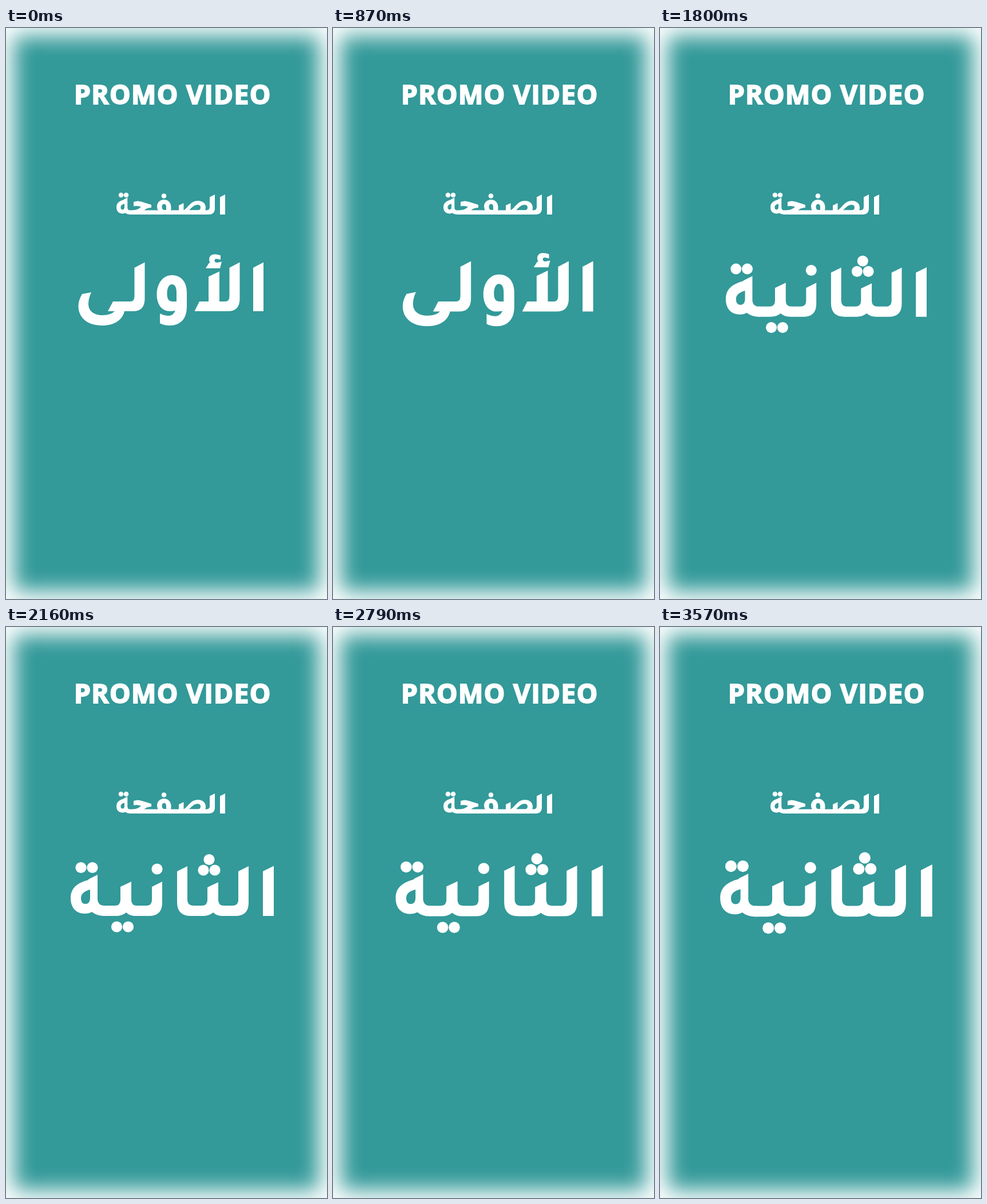
Animation, 561 px wide and 998 px high, one loop 3600 ms. Source, as an HTML page with a canvas:

```html
<!DOCTYPE html>
<html lang="ar">
<head>
<meta charset="utf-8">
<title>Promo video</title>
<style>
  html, body { margin: 0; width: 100%; height: 100%; overflow: hidden; }
  .stage {
    width: 561px;
    height: 998px;
    background: #339999;
    box-shadow: inset 0 0 37px 14px #fff;
  }
  canvas { display: block; }
</style>
</head>
<body>
<div class="stage">
  <canvas id="view" width="561" height="998">PROMO VIDEO – الصفحة الأولى – الصفحة الثانية</canvas>
</div>
<script>
const LOOP = 3600;
const STEP = 30;
const SWITCH_AT = 1800;
const GROWTH = 0.12;
const SECOND_SCALE = 1.072; // growth at which the second word was laid out

const ctx = document.getElementById('view').getContext('2d');

// Final teh marbuta, shared by both lettering sizes.
const TEH = 'M174 505H171Q159 505 150 498Q145 501 138 501C122 501 113 490 113 474' +
  'C113 455 126 447 144 442V441L160 433V476Q161 487 172 487H174Z' +
  'M147 459Q131 463 131 474Q131 484 139 484Q146 484 147 475Z';

const lettering = (shapes, dots = [], radius = 0) => ({
  paths: shapes.map(d => new Path2D(d)), dots, radius
});

const pageWord = lettering([
  'M374 295.5L383 291V326H374Z',
  'M356 295.5L365 291V315Q365 326 354 326H217V318.5H351Q356 318 356 313Z',
  'M302 310L310.5 306V320H302Z',
  'M307 326V320C317 318 321 302 335 302C345 302 349 308 349 314Q349 321 344 326Z' +
  'M320 318.5C326 312 330 309 335 309Q340 309 340 313.5Q340 318.5 335 318.5Z',
  'M276 300C284 300 288.5 306 288.5 313V316Q288 324 280 324H273Q264 321 264 312' +
  'C264 305 269 300 276 300Z' +
  'M276.5 307.5Q272.5 308 272.5 312.5Q272.5 318 277 318H280V313Q280 308 276.5 307.5Z',
  'M223 304Q230 301 238 304L254 309V314Q245 314 240 320Q234 326 222 326V318.5' +
  'Q231 318 236 312.5Q230 310 223 311.5Z'
], [[201, 292], [210, 292], [276, 293.5]], 4.3);

const firstWord = lettering([
  'M432 419L450 409.5V495H432Z',
  'M390.5 419L408.5 409.5V474Q408 495 388 495H329.5L338 478H354V434.5L373 425.5V478' +
  'H383Q390.5 478 390.5 469Z',
  'M349 420L355 410.5H357Q355 408 355 405Q355 395.5 365 395.5Q370 395.5 375 397.5' +
  'V405Q370 403 367 403.5Q364 404 364.5 407Q365 410 369 410L377 408.5L374 420Z',
  'M290 432C306 432 316 444 316 462V487C316 508 305 520 286 520Q276 520 269 516V499' +
  'Q277 503 284 503Q292 503 296 494Q291 495 286 495C271 495 263.5 481 263.5 466' +
  'C263.5 447 274 432 290 432Z' +
  'M290 448C284 448 281.5 456 281.5 464C281.5 473 284 478 291 478H298V462C298 453 295 448 290 448Z',
  'M224.5 419L242.5 409.5V474Q242 495 222 495H207C203 511 189 520 168 520' +
  'C142 520 126.5 506 126.5 486Q126.5 476 133 465L149 462Q144 473 144 482' +
  'C144 495 154 502 169 502Q183 502 190 495H178L187 478H217Q224.5 478 224.5 469Z'
]);

const secondWord = lettering([
  'M449 427L468 417.5V505H449Z',
  'M406 427L424 418V482Q424 505 401 505H379Q368 505 362 499Q355 505 344 505H323' +
  'Q299 505 299 481V427L317 418V476Q317 487 328 487H342Q352 487 352 477V455L371 446' +
  'V477Q371 487 381 487H396Q406 487 406 476Z',
  'M255 454L273 445V482Q273 505 250 505H227Q216 505 210 499Q203 505 192 505H171V487' +
  'H190Q200 487 200 477V454L219 445V477Q219 487 229 487H245Q255 487 255 477Z',
  TEH
], [[355, 406.5], [345, 425], [365, 425], [264, 423], [193.5, 524], [213.5, 524],
    [131, 420.5], [151, 420.5]], 9.6);

const teh = new Path2D(TEH);

function drawLettering({ paths, dots, radius }) {
  for (const path of paths) ctx.fill(path, 'evenodd');
  for (const [x, y] of dots) {
    ctx.beginPath();
    ctx.arc(x, y, radius, 0, Math.PI * 2);
    ctx.fill();
  }
}

function drawScaled(word, cx, cy, scale) {
  ctx.save();
  ctx.translate(cx, cy);
  ctx.scale(scale, scale);
  ctx.translate(-cx, -cy);
  drawLettering(word);
  ctx.restore();
}

function drawTitle() {
  ctx.font = '700 46px "Open Sans", "Noto Sans", sans-serif';
  ctx.letterSpacing = '1.4px';
  ctx.direction = 'ltr';
  ctx.textAlign = 'left';
  ctx.lineWidth = 2;
  ctx.miterLimit = 3;
  ctx.fillText('PROMO VIDEO', 118.9, 133);
  ctx.strokeText('PROMO VIDEO', 118.9, 133);
}

function drawPage() {
  drawLettering(pageWord);
  ctx.save();
  ctx.translate(146.7, 119);
  ctx.scale(0.41, 0.41);
  ctx.fill(teh, 'evenodd');
  ctx.restore();
}

function render(now) {
  const time = Math.floor((now % LOOP) / STEP) * STEP;
  const scale = 1 + GROWTH * time / LOOP;
  ctx.clearRect(0, 0, 561, 998);
  ctx.fillStyle = ctx.strokeStyle = '#fff';
  drawTitle();
  drawPage();
  if (time < SWITCH_AT) drawScaled(firstWord, 288.5, 477, scale);
  else drawScaled(secondWord, 290, 475, scale / SECOND_SCALE);
}

const start = performance.now();
function tick() {
  render(performance.now() - start);
  requestAnimationFrame(tick);
}
tick();
</script>
</body>
</html>
```
